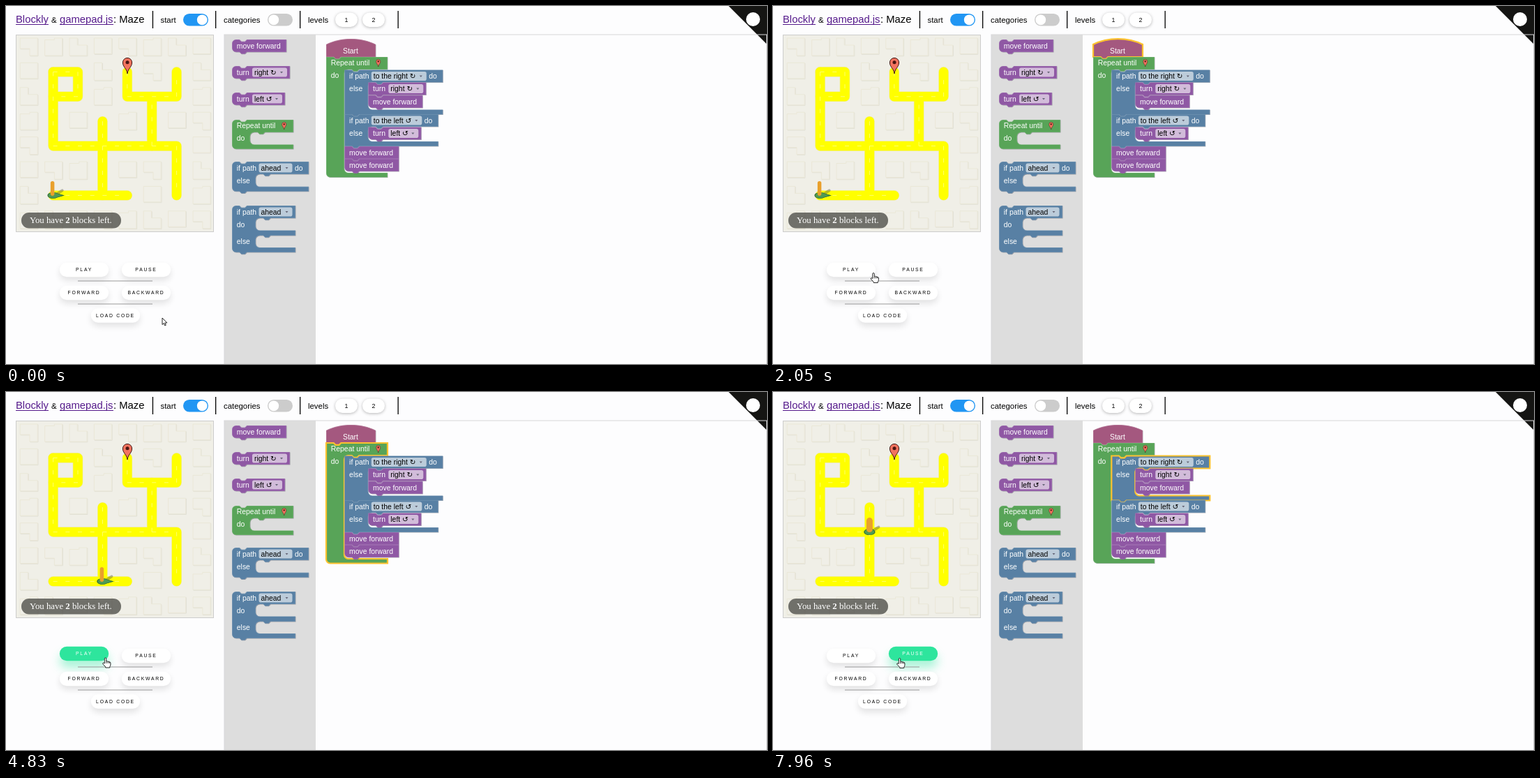
Animation of 1091 by 513 pixels, one loop 8000 ms. Source, as an HTML page with a canvas:

```html
<!DOCTYPE html>
<html lang="en">
<head>
<meta charset="utf-8">
<title>Maze</title>
<style>
html, body { margin: 0; width: 100%; height: 100%; overflow: hidden; background: #fdfdfe; }
canvas { display: block; }
</style>
</head>
<body>
<canvas id="stage" width="1091" height="513"></canvas>
<script>
const ctx = document.getElementById('stage').getContext('2d');
const LOOP = 8000;
const SANS = '"Liberation Sans", Arial, "DejaVu Sans", sans-serif';
const SERIF = '"Liberation Serif", "Times New Roman", serif';
const PURPLE = '#8f58a4', GREEN = '#58a458', BLUE = '#5880a4', ROSE = '#a4587f';
const CELL = 35.4, R = 5.7;
const cellX = i => 14.5 + CELL * (i + 0.5);
const cellY = j => 41.3 + CELL * (j + 0.5);
const clamp = v => Math.max(0, Math.min(1, v));
const smooth = v => v * v * (3 - 2 * v);
const mix = (a, b, k) => a + (b - a) * k;
const blend = (a, b, k) => 'rgb(' + a.map((v, i) => Math.round(mix(v, b[i], k))) + ')';

function text(str, x, y, size = 10.4, color = '#fff', opt = {}) {
  ctx.font = `${opt.bold ? 'bold ' : ''}${size}px ${opt.font || SANS}`;
  ctx.letterSpacing = (opt.space || 0) + 'px';
  ctx.textAlign = opt.align || 'left';
  ctx.textBaseline = 'alphabetic';
  ctx.fillStyle = color;
  ctx.fillText(str, x, y);
  const w = ctx.measureText(str).width;
  ctx.letterSpacing = '0px';
  return w;
}

function pill(x, y, w, h, r, color) {
  ctx.beginPath();
  ctx.roundRect(x, y, w, h, r);
  ctx.fillStyle = color;
  ctx.fill();
}

function disc(x, y, r, color) {
  ctx.beginPath();
  ctx.arc(x, y, r, 0, 7);
  ctx.fillStyle = color;
  ctx.fill();
}

function shadow(color, dy, blur) {
  ctx.shadowColor = color;
  ctx.shadowOffsetY = dy;
  ctx.shadowBlur = blur;
}

function poly(points, fill, stroke, width = 1) {
  ctx.beginPath();
  points.forEach(([x, y], i) => i ? ctx.lineTo(x, y) : ctx.moveTo(x, y));
  if (fill) { ctx.closePath(); ctx.fillStyle = fill; ctx.fill(); }
  if (stroke) { ctx.strokeStyle = stroke; ctx.lineWidth = width; ctx.stroke(); }
}

// ---------- header ----------
function link(str, x, w) {
  text(str, x, 24.3, 14.8, '#551a8b');
  ctx.fillRect(x, 26, w, 1);
}

function toggle(x, on) {
  pill(x, 11, 36, 17.5, 8.8, on ? '#2196f3' : '#ccc');
  disc(on ? x + 27.2 : x + 8.8, 19.8, 7.4, '#fff');
}

function header() {
  link('Blockly', 14, 47);
  text('&', 65, 24.3, 11.5, '#000');
  link('gamepad.js', 77, 77);
  text(': Maze', 154, 24.3, 14.8, '#000');
  ctx.fillStyle = '#000';
  for (const x of [209.8, 300, 421, 561.5]) ctx.fillRect(x, 7, 1.3, 25);
  text('start', 221.5, 23.6, 11.4, '#000');
  text('categories', 312, 23.6, 11.4, '#000');
  text('levels', 433, 23.6, 11.4, '#000');
  toggle(254, true);
  toggle(375, false);
  [488, 527].forEach((x, i) => {
    shadow('rgba(0,0,0,.28)', 1, 4);
    pill(x - 16, 9.5, 32, 20.5, 10.2, '#fff');
    shadow('transparent', 0, 0);
    text(String(i + 1), x, 22.8, 8.8, '#000', { align: 'center' });
  });
  poly([[1036, 0], [1091, 0], [1091, 55]], '#151513');
  disc(1071, 19, 10, '#fff');
}

// ---------- maze ----------
const roads = [
  [[1, 1], [2, 1], [2, 2], [1, 2]],
  [[1, 1], [1, 4], [6, 4], [6, 6]],
  [[3, 3], [3, 6]],
  [[1, 6], [4, 6]],
  [[5, 4], [5, 2]],
  [[4, 1], [4, 2], [6, 2], [6, 1]]
];

function onRoad(i, j) {
  return roads.some(line => line.slice(1).some(([x, y], k) => {
    const [a, b] = line[k];
    return i >= Math.min(a, x) && i <= Math.max(a, x) && j >= Math.min(b, y) && j <= Math.max(b, y);
  }));
}

function building(i, j) {
  const kind = (i * 3 + j * 5) % 4, x = cellX(i) - 12, y = cellY(j) - 13, w = 25, h = 25;
  const shapes = [
    [[0, 0], [1, 0], [1, 1], [0.55, 1], [0.55, 0.6], [0, 0.6]],
    [[0, 0], [1, 0], [1, 0.9], [0, 0.9]],
    [[0, 0], [0.45, 0], [0.45, 0.4], [1, 0.4], [1, 1], [0, 1]],
    [[0, 0.1], [0.55, 0.1], [0.55, 0], [1, 0], [1, 1], [0, 1]]
  ];
  const pts = shapes[kind].map(([u, v]) => [x + u * w, y + v * h]);
  poly([...pts, pts[0]].map(([a, b]) => [a + 0.8, b + 0.8]), null, '#e0dfd5', 1);
  poly([...pts, pts[0]], '#f0efe7', '#eae7d6', 0.9);
}

function strokeRoads(color, width, dash) {
  ctx.setLineDash(dash || []);
  ctx.lineCap = dash ? 'butt' : 'round';
  ctx.lineJoin = 'round';
  for (const line of roads)
    poly(line.map(([i, j]) => [cellX(i), cellY(j)]), null, color, width);
  ctx.setLineDash([]);
  ctx.lineCap = 'butt';
  ctx.lineJoin = 'miter';
}

function pin(x, tip, s) {
  ctx.save();
  ctx.translate(x, tip);
  ctx.scale(s, s);
  ctx.beginPath();
  ctx.moveTo(0, 0);
  ctx.bezierCurveTo(-1, -8, -6.6, -9.5, -6.6, -16);
  ctx.arc(0, -16, 6.6, Math.PI, 0);
  ctx.bezierCurveTo(6.6, -9.5, 1, -8, 0, 0);
  ctx.fillStyle = '#f3735f';
  ctx.fill();
  ctx.strokeStyle = '#3a1512';
  ctx.lineWidth = 1;
  ctx.stroke();
  disc(0, -16.3, 2.5, '#4a1512');
  ctx.restore();
}

function maze() {
  ctx.fillStyle = '#f0efe7';
  ctx.fillRect(14, 41, 284, 283);
  for (let i = 0; i < 8; i++)
    for (let j = 0; j < 8; j++) if (!onRoad(i, j)) building(i, j);
  strokeRoads('#f0ec96', 14.6);
  strokeRoads('#ffff00', 13.4);
  strokeRoads('#ffff70', 1, [6, 11.7]);
  ctx.strokeStyle = '#ccc';
  ctx.lineWidth = 1;
  ctx.strokeRect(14.5, 41.5, 283, 282);
  pin(174, 97, 1);
}

// ---------- program run ----------
const STEP = 450, RUN_START = 2160;
const program = ['repeat', 'right', 'left', 'move1', 'move2',
  'repeat', 'right', 'left', 'turn', 'move1', 'move2', 'repeat', 'right'];

function litBlock(t) {
  if (t < 900) return '';
  if (t < RUN_START) return 'start';
  return program[Math.min(program.length - 1, Math.floor((t - RUN_START) / STEP))];
}

// each action plays in four quarter poses
function progress(t, index) {
  const dt = t - RUN_START - index * STEP;
  return dt < 0 ? 0 : Math.min(4, Math.floor(dt / 90) + 1) / 4;
}

function walker(t) {
  const x = cellX(1 + progress(t, 3) + progress(t, 4));
  const y = cellY(6 - progress(t, 9) - progress(t, 10));
  const turn = progress(t, 8), a = -turn * Math.PI / 2;
  ctx.save();
  ctx.translate(x, y);
  ctx.strokeStyle = 'rgba(90,90,70,.42)';
  ctx.lineCap = 'round';
  ctx.lineWidth = 4;
  ctx.beginPath();
  ctx.moveTo(2, 0);
  ctx.lineTo(13, -7);
  ctx.stroke();
  ctx.lineCap = 'butt';
  ctx.save();
  ctx.scale(1, 0.55);
  ctx.rotate(a);
  ctx.beginPath();
  ctx.arc(0, 0, 7.6, 0.75, -0.75);
  ctx.lineTo(15, 0);
  ctx.closePath();
  ctx.fillStyle = '#4f9a55';
  ctx.fill();
  ctx.strokeStyle = '#2c6a35';
  ctx.lineWidth = 1.2;
  ctx.stroke();
  ctx.restore();
  const w = mix(5.5, 9, turn);
  pill(-w / 2 - (1 - turn), -20.5, w, 21, w / 2, '#e9a02c');
  ctx.restore();
}

function badge() {
  pill(22, 296, 143, 22.5, 11, 'rgba(80,80,76,.8)');
  let x = 34;
  const opt = { font: SERIF };
  x += text('You have ', x, 311, 12.8, '#fff', opt);
  x += text('2', x, 311, 12.8, '#fff', { font: SERIF, bold: true });
  text(' blocks left.', x, 311, 12.8, '#fff', opt);
}

// ---------- blocks ----------
function outline(b) {
  const { x, y, w, h } = b, p = new Path2D();
  const notch = (sx, sy, back) => {
    const pts = [[10.7, 0], [13.5, 2.8], [18.5, 2.8], [21.3, 0]];
    if (back) pts.reverse();
    pts.forEach(([u, v]) => p.lineTo(sx + u, sy + v));
  };
  if (b.hat) {
    p.moveTo(x, y);
    p.bezierCurveTo(x + 21.3, y - 10.6, x + 49.7, y - 10.6, x + w, y);
  } else {
    if (b.flat) p.moveTo(x, y);
    else { p.moveTo(x, y + R); p.arcTo(x, y, x + R, y, R); }
    notch(x, y);
    p.lineTo(x + w, y);
  }
  for (const [sx, y0, y1] of b.slots || []) {
    p.lineTo(x + w, y0);
    notch(sx, y0, true);
    p.arcTo(sx, y0, sx, y0 + R, R);
    p.arcTo(sx, y1, sx + R, y1, R);
    p.lineTo(x + w, y1);
  }
  p.lineTo(x + w, y + h);
  if (!b.end) notch(x, y + h, true);
  if (b.joined) p.lineTo(x, y + h);
  else p.arcTo(x, y + h, x, y + h - R, R);
  p.closePath();
  return p;
}

function block(b, lit) {
  const p = outline(b);
  ctx.save();
  ctx.translate(0.5, 0.5);
  ctx.fillStyle = 'rgba(45,45,60,.4)';
  ctx.fill(p);
  ctx.restore();
  ctx.fillStyle = b.color;
  ctx.fill(p);
  ctx.save();
  ctx.clip(p);
  ctx.strokeStyle = 'rgba(255,255,255,.2)';
  ctx.lineWidth = 1.2;
  ctx.stroke(p);
  ctx.restore();
  if (b.id && b.id === lit) {
    ctx.strokeStyle = '#fcc22f';
    ctx.lineWidth = 2.2;
    ctx.stroke(p);
  }
}

function field(str, x, cy, w) {
  pill(x, cy - 6.5, w, 13, 2.8, 'rgba(255,255,255,.6)');
  text(str, x + 3, cy + 3.6, 10.4, '#000');
  poly([[x + w - 10, cy - 1], [x + w - 6, cy - 1], [x + w - 8, cy + 1.6]], '#667');
}

const label = (str, x, cy) => text(str, x, cy + 3.6);

function move(x, y, opt, lit) {
  block({ x, y, w: 78, h: 18, color: PURPLE, ...opt }, lit);
  label('move forward', x + 6.8, y + 9);
}

function turn(x, y, right, opt, lit) {
  block({ x, y, w: right ? 83 : 76, h: 18, color: PURPLE, ...opt }, lit);
  label('turn', x + 6.8, y + 9);
  field(right ? 'right ↻' : 'left ↺', x + 29, y + 9, right ? 50 : 43);
}

function repeat(x, y, slotX, depth, opt, lit) {
  const y1 = y + 18 + depth;
  block({ x, y, w: 88, h: depth + 24.5, color: GREEN, end: true, slots: [[slotX, y + 18, y1]], ...opt }, lit);
  label('Repeat until', x + 6.8, y + 8.5);
  pin(x + 74.7, y + 14, 0.46);
  label('do', x + 6.8, y + 26.5);
}

function branch(x, y, w, depth, str, fw, opt, lit) {
  block({ x, y, w, h: depth + 25, color: BLUE, slots: [[x + 34, y + 18, y + 18 + depth]], ...opt }, lit);
  label('if path', x + 6.8, y + 9);
  field(str, x + 38.5, y + 9, fw);
  label('do', x + 42 + fw, y + 9);
  label('else', x + 6.8, y + 27);
}

function flyout() {
  ctx.fillStyle = '#dddddd';
  ctx.fillRect(313, 41, 131, 472);
  ctx.fillStyle = '#d8d8da';
  ctx.fillRect(312.5, 40.5, 778.5, 1);
  ctx.fillRect(312.5, 41, 1, 472);
  ctx.fillRect(1090, 41, 1, 472);
  move(324, 48);
  turn(324, 86, true);
  turn(324, 124, false);
  repeat(324, 163, 350, 17.5);
  branch(324, 223, 110, 17.8, 'ahead', 48);
  block({ x: 324, y: 286, w: 91, h: 67, color: BLUE, slots: [[358, 304, 321.5], [358, 329, 346]] });
  label('if path', 330.8, 295);
  field('ahead', 362.5, 295, 48);
  label('do', 330.8, 313);
  label('else', 330.8, 337.5);
}

function workspace(lit) {
  const inner = { flat: true, joined: true };
  block({ x: 459, y: 55, w: 71, h: 18, color: ROSE, hat: true, joined: true, id: 'start' }, lit);
  text('Start', 494, 67.6, 10.4, '#fff', { align: 'center' });
  repeat(459, 73, 485, 148, { flat: true, id: 'repeat' }, lit);
  branch(485.3, 91.5, 141, 39, 'to the right ↻', 79, { ...inner, id: 'right' }, lit);
  turn(519.3, 109.5, true, inner);
  move(519.3, 128, { flat: true });
  branch(485.3, 155, 134.5, 21, 'to the left ↺', 72.5, { ...inner, id: 'left' }, lit);
  turn(519.3, 173.5, false, { flat: true, id: 'turn' }, lit);
  move(485.3, 201, { ...inner, id: 'move1' }, lit);
  move(485.3, 219, { flat: true, id: 'move2' }, lit);
}

// ---------- buttons and pointer ----------
const MINT = [46, 229, 157], VIOLET = [134, 0, 255];
const buttons = [
  { name: 'PLAY', x: 112, y: 378, tint: MINT, on: 2060, off: 6690 },
  { name: 'PAUSE', x: 201, y: 378, tint: MINT, on: 7065, off: LOOP },
  { name: 'FORWARD', x: 112, y: 411, tint: MINT },
  { name: 'BACKWARD', x: 201, y: 411, tint: MINT },
  { name: 'LOAD CODE', x: 157, y: 443.5, tint: VIOLET, on: 570, off: 1600 }
];
const ease = v => 1 - Math.pow(1 - clamp(v), 2.5);

function button(b, t) {
  const k = b.on ? ease((t - b.on) / 300) - ease((t - b.off) / 300) : 0;
  const y = b.y - 3 * k;
  const glow = b.tint.map(v => Math.round(v * k));
  shadow(`rgba(${glow},${mix(0.11, 0.4, k)})`, mix(5, 10, k), mix(10, 14, k));
  pill(b.x - 35.2, y - 10.2, 70.4, 20.4, 10.2, blend([255, 255, 255], b.tint, k));
  shadow('transparent', 0, 0);
  text(b.name, b.x, y + 2.4, 6.8, blend([0, 0, 0], [255, 255, 255], k), { align: 'center', space: 1.75 });
}

const path = [[0, 224, 447], [250, 224, 447], [750, 174.5, 447], [1450, 174.5, 447], [2060, 144, 382.5],
  [2500, 142.5, 381], [6580, 142.5, 381], [6800, 159.5, 381], [6950, 160, 381], [7300, 181.5, 381.5], [LOOP, 181.5, 381.5]];

function pointer(t) {
  const i = Math.max(1, path.findIndex(p => p[0] > t));
  const [a, b] = [path[i - 1], path[i]];
  const k = smooth((t - a[0]) / (b[0] - a[0]));
  const hand = buttons.some(q => q.on && t >= q.on - 30 && t < q.off);
  ctx.save();
  ctx.translate(mix(a[1], b[1], k), mix(a[2], b[2], k));
  ctx.lineJoin = 'round';
  const p = new Path2D(hand
    ? 'M-1.2 8V1.2Q-1.2 0 0 0T1.2 1.2V5Q2.8 4.2 3.6 5.4Q5 4.8 5.8 6Q7.3 5.8 7.4 7.3V10Q7.2 11.5 6.3 12.6V14H.2V12.8L-3.8 8.6Q-4 6.9-2.3 7.2Z'
    : 'M0 0V9.6L2.2 7.5L3.8 11L5.3 10.3L3.8 7H6.9Z');
  ctx.fillStyle = '#fff';
  ctx.fill(p);
  ctx.strokeStyle = '#111';
  ctx.lineWidth = 0.9;
  ctx.stroke(p);
  if (hand) {
    ctx.beginPath();
    for (const x of [1.2, 3.6, 5.8]) { ctx.moveTo(x, 5.4); ctx.lineTo(x, 7.8); }
    ctx.stroke();
  }
  ctx.restore();
}

function draw(now) {
  const t = now % LOOP;
  ctx.fillStyle = '#fdfdfe';
  ctx.fillRect(0, 0, 1091, 513);
  header();
  maze();
  walker(t);
  badge();
  flyout();
  workspace(litBlock(t));
  buttons.forEach(b => button(b, t));
  ctx.fillStyle = '#999';
  ctx.fillRect(103, 393.5, 107, 1);
  ctx.fillRect(103, 426.5, 107, 1);
  pointer(t);
}

let origin;
function tick(now) {
  origin ??= now;
  draw(now - origin);
  requestAnimationFrame(tick);
}
requestAnimationFrame(tick);
</script>
</body>
</html>
```
